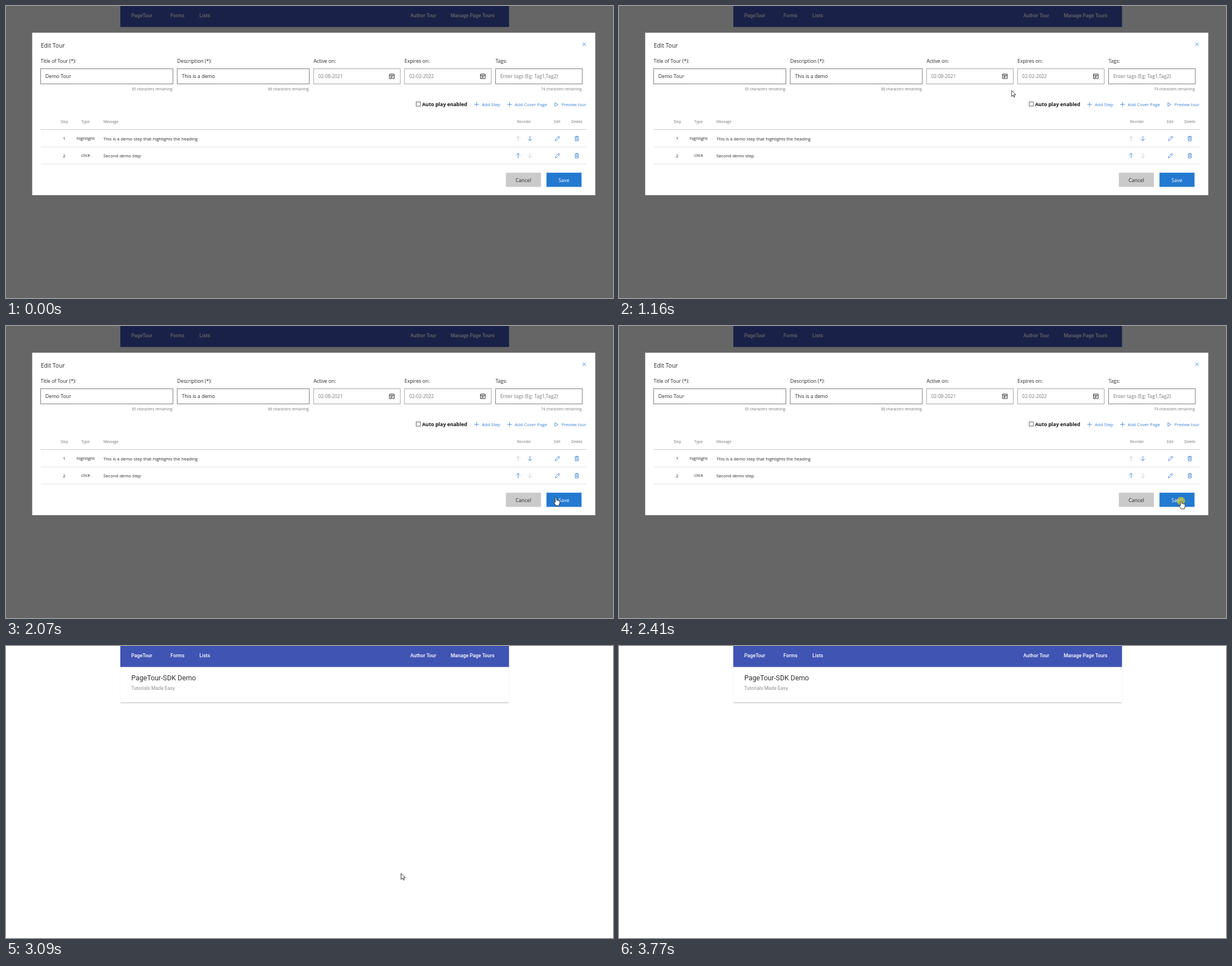
An HTML page with a canvas that plays this animation: 1078x519 px, repeating every 4.04 s.

```html
<!DOCTYPE html>
<html lang="en">
<head>
<meta charset="utf-8">
<title>Edit Tour</title>
<style>
  html, body { margin: 0; width: 100%; height: 100%; overflow: hidden; background: #fff; }
  canvas { display: block; }
</style>
</head>
<body>
<canvas id="stage" width="1078" height="519"></canvas>
<script>
const LOOP = 4040, CLICK = 2410, SAVED = 2480, STEP = 70;
const UI = '"Open Sans", sans-serif';
const MDL = 'Roboto, sans-serif';
const BLUE = '#3a80d2', INK = '#262626', GREY = '#767676', PALE = '#cacaca';
const ctx = document.getElementById('stage').getContext('2d');

function text(str, x, y, size, { color = INK, weight = 400, family = UI, align = 'left' } = {}) {
  ctx.font = `${weight} ${size}px ${family}`;
  ctx.fillStyle = color;
  ctx.textAlign = align;
  ctx.fillText(str, x, y);
}

function rect(x, y, w, h, color) {
  ctx.fillStyle = color;
  ctx.fillRect(x, y, w, h);
}

function box(x, y, w, h, color) {
  ctx.strokeStyle = color;
  ctx.lineWidth = 1;
  ctx.strokeRect(x, y, w, h);
}

const ICONS = {
  plus: 'M-4.3 0H4.3M0-4.3V4.3',
  play: 'M-2.3-3.2L3 0L-2.3 3.2Z',
  arrow: 'M0 4.5V-4M-3.7-.5L0-4.2L3.7-.5',
  pencil: 'M-4 4L-3 1L2.5-4.3L4.3-2.5L-1 3ZM1-3L3-1',
  trash: 'M-3.5-3H3.5M-1.2-3V-4.2H1.2V-3M-2.7-3V4.2H2.7V-3M-1-1.4V2.7M1-1.4V2.7',
  calendar: 'M-4.2-4H4.2V4H-4.2ZM-4.2-1.7H4.2M-2.2 .3H2.2M-2.2 2H.8',
  pointer: 'M0 0V10.8L2.5 8.5L4.1 12.1L5.8 11.4L4.3 7.9H7.5Z',
  hand: 'M-1.3 1Q0-.7 1.2 1V5L5 5.8Q6.8 5.6 6.8 7.5V10.3L5.5 14.6H-.2L-3.5 9.5Q-4-7 -1.3 9Z'.replace('-4-7 ', '-3.8 6.6 ')
};

function icon(name, x, y, { color = BLUE, turn = 0, fill, width = 0.85 } = {}) {
  const path = new Path2D(ICONS[name]);
  ctx.save();
  ctx.translate(x, y);
  ctx.rotate(turn * Math.PI * 2);
  if (fill) {
    ctx.fillStyle = fill;
    ctx.fill(path);
  }
  ctx.strokeStyle = color;
  ctx.lineWidth = width;
  ctx.lineJoin = 'round';
  ctx.stroke(path);
  ctx.restore();
}

function drawPage() {
  rect(0, 0, 1078, 519, '#fff');
  rect(202.6, 37, 690.8, 64, '#f0f0f0');
  rect(203, 37, 690, 63.5, '#fff');
  rect(203.5, 100.5, 689, 1, '#b8b8b8');
  rect(203, 0, 690.3, 37.3, '#4054b4');
  const nav = { PageTour: 222.5, Forms: 292, Lists: 343.5, 'Author Tour': 718, 'Manage Page Tours': 789.7 };
  for (const label in nav) text(label, nav[label], 20, 8.75, { color: '#fff', weight: 500, family: MDL });
  text('PageTour-SDK Demo', 222.5, 61, 12.35, { color: '#333', family: MDL });
  text('Tutorials Made Easy', 222.5, 77.8, 8.65, { color: '#8f8f8f', family: MDL });
}

const FIELDS = [
  { label: 'Title of Tour (*):', value: 'Demo Tour', w: 235, left: 65 },
  { label: 'Description (*):', value: 'This is a demo', w: 234.5, left: 86 },
  { label: 'Active on:', value: '02-08-2021', w: 154, date: true },
  { label: 'Expires on:', value: '02-02-2022', w: 154, date: true },
  { label: 'Tags:', value: 'Enter tags (Eg: Tag1,Tag2)', w: 154, left: 74, hint: true }
];

function drawFields() {
  let x = 61.5;
  for (const { label, value, w, left, date, hint } of FIELDS) {
    text(label, x, 101.2, 8.75);
    box(x, 111.5, w, 27, date ? '#a3a3a3' : '#7c7c7c');
    text(value, x + 8.3, 128, date ? 8.4 : 8.8, { color: date || hint ? GREY : INK });
    if (date) icon('calendar', x + 139, 125, { color: '#333', width: 1 });
    else text(`${left} characters remaining.`, x + w + 0.5, 149.8, 6.4, { color: GREY, align: 'right' });
    x += w + 7.6;
  }
}

function drawRow(y, step, type, message, first) {
  text(step, 103.3, y + 3, 7.75, { align: 'center' });
  text(type, 141.5, y + 2.7, 7.9, { align: 'center' });
  text(message, 173, y + 3.9, 7.72);
  icon('arrow', 909.5, y + 0.5, { color: first ? PALE : BLUE });
  icon('arrow', 930.5, y + 0.5, { color: first ? BLUE : PALE, turn: 0.5 });
  icon('pencil', 979.3, y + 0.5);
  icon('trash', 1013.7, y + 0.5);
  rect(62, y + 15, 969, 1, '#e2e2e2');
}

function action(name, label, x, size) {
  icon(name, x, 175);
  text(label, x + 9.2, 178.2, size, { color: BLUE });
}

function button(label, x, color, ink) {
  rect(x, 296.3, 62.3, 25.2, color);
  text(label, x + 31, 312.7, 8.85, { color: ink, align: 'center' });
}

function drawDialog() {
  rect(0, 0, 1078, 519, 'rgba(0,0,0,.6)');
  rect(46.5, 47.5, 1000, 288.7, '#fff');
  text('Edit Tour', 61.8, 73.8, 10.3);
  icon('plus', 1026.7, 68, { turn: 1 / 8 });
  drawFields();

  box(728.5, 170.5, 7.5, 7.5, '#666');
  text('Auto play enabled', 739, 178.2, 8.85, { color: '#111', weight: 700 });
  action('plus', 'Add Step', 835.8, 7.85);
  action('plus', 'Add Cover Page', 894.3, 7.85);
  action('play', 'Preview tour', 977.2, 7.6);

  const heads = { Step: 97, Type: 134, Message: 173, Reorder: 907.8, Edit: 973, Delete: 1004 };
  for (const label in heads) text(label, heads[label], 208.2, 6.5, { color: GREY });
  rect(62, 219, 969, 1, PALE);
  drawRow(235, '1', 'highlight', 'This is a demo step that highlights the heading', true);
  drawRow(265.5, '2', 'click', 'Second demo step', false);

  button('Cancel', 887.7, PALE, INK);
  button('Save', 959.8, '#2479d0', '#fff');
}

const linear = u => u;
const speedUp = u => u ** 1.8;
const slowDown = u => 1 - (1 - u) ** 1.9;
const launch = u => u ** 3;
const settle = u => 1 - (1 - u) ** 3;

// Pointer stops; the easings lead to each stop from the one before.
const STOPS = [
  { t: 200, x: 1072, y: 488 },
  { t: 670, x: 996, y: 201, ease: slowDown },
  { t: 1230, x: 616, y: 149, ease: speedUp, easeY: slowDown },
  { t: 1580, x: 379, y: 142, ease: slowDown },
  { t: 1790, x: 721, y: 235, ease: launch },
  { t: 2280, x: 998.5, y: 310.5, ease: settle },
  { t: 2810, x: 998.5, y: 310.5, ease: linear },
  { t: 2880, x: 955, y: 301.5, ease: linear },
  { t: 3160, x: 682, y: 412, ease: slowDown },
  { t: 3350, x: 743, y: 415, ease: speedUp },
  { t: 3770, x: 1099, y: 523, ease: linear }
];
const SAMPLE_STARTS = [200, 670, 2880, 3350];

function pointerAt(time) {
  const start = SAMPLE_STARTS.filter(s => s <= time).pop();
  const t = time - (time - start) % STEP;
  const i = STOPS.findIndex(stop => stop.t > t);
  const a = STOPS[i - 1], b = STOPS[i];
  const u = (t - a.t) / (b.t - a.t);
  const { ease, easeY = ease } = b;
  return [a.x + (b.x - a.x) * ease(u), a.y + (b.y - a.y) * easeY(u)];
}

function drawPointer(time) {
  if (time < 200 || time >= 3770) return;
  const [x, y] = pointerAt(time);
  const onSave = time < SAVED && x > 960 && x < 1022 && y > 296 && y < 322;
  if (time >= CLICK && time < SAVED) {
    ctx.fillStyle = 'rgba(225,215,30,.65)';
    ctx.beginPath();
    ctx.arc(998, 311, 7.3, 0, Math.PI * 2);
    ctx.fill();
  }
  icon(onSave ? 'hand' : 'pointer', x, y, { color: '#111', fill: '#fff' });
}

const origin = performance.now();

function frame() {
  const time = (performance.now() - origin) % LOOP;
  drawPage();
  if (time < SAVED) drawDialog();
  drawPointer(time);
  requestAnimationFrame(frame);
}

frame();
</script>
</body>
</html>
```
